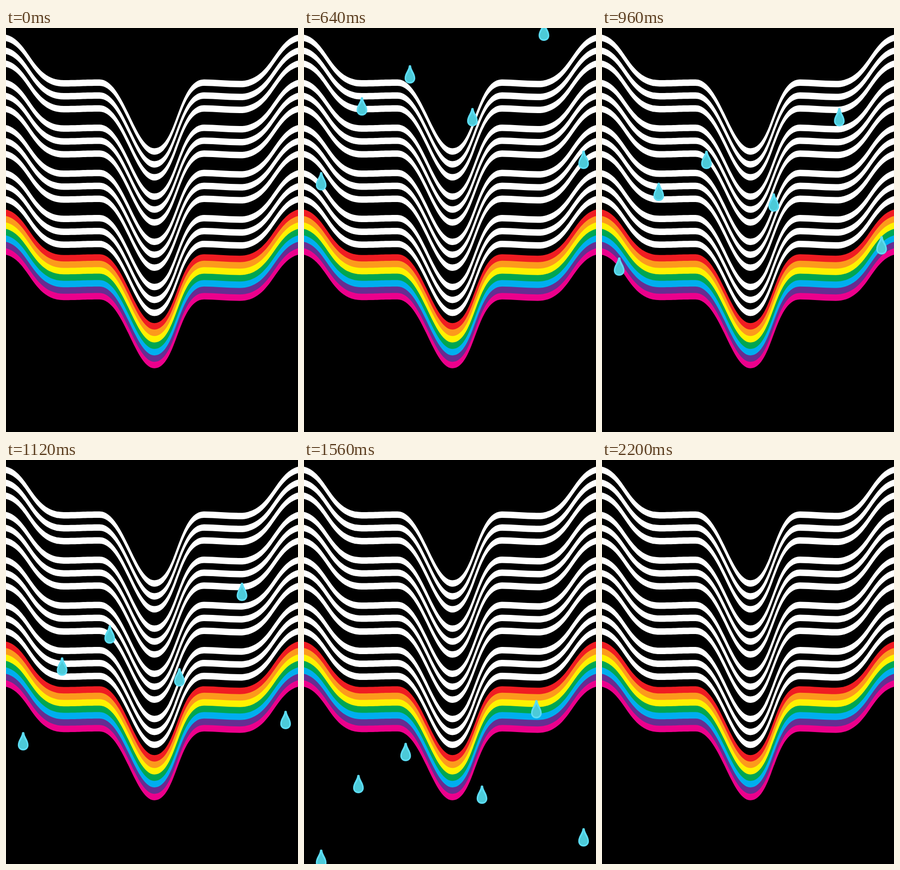
Write an HTML page that moves like this. It is 612x845 px and loops after 2280 ms.

```html
<!DOCTYPE html>
<html lang="en">
<head>
<meta charset="utf-8">
<title>Rainbow waves and falling drops</title>
<style>
  html, body { margin: 0; width: 100%; height: 100%; overflow: hidden; background: #000; }
  svg { display: block; width: 100vw; height: 100vh; }
</style>
</head>
<body>
<svg viewBox="0 0 612 845">
  <defs>
    <g id="drop">
      <path fill="#5cdcf3" d="M-2.4 1Q0-1 2.4 1C2.8 10 11.2 17 11.2 27.5C11.2 34 6 38.5 0 38.5S-11.2 34-11.2 27.5C-11.2 17-2.8 10-2.4 1Z"/>
      <path fill="#4ccad8" d="M0 8C2 15 8 20 8 27C8 32 5 35 0 35S-8 32-8 27C-8 20-2 15 0 8Z"/>
    </g>
  </defs>
  <g id="waves"></g>
  <g id="rain"></g>
</svg>
<script>
const NS = 'http://www.w3.org/2000/svg';
const LOOP = 2280, STEP = 40, LAST = 55;
const FALL = 22.33, TOP = -33.8, LIFE = 40;
const BAND = 13.5, GROUP = 7 * BAND;

// Upper edge of the first stripe, closed far below the stage.
const WAVE = 'M0 14C49 26 55 109 121 109C150 109 165 107.5 196 107.5' +
  'C246 107.5 270 251.5 311 251.5C358 251.5 361 107.5 415 107.5' +
  'C440 107.5 460 110.5 490 110.5C556 110.5 562 28 612 14V900H0Z';

const RAINBOW = ['#f01c22', '#fc9a1c', '#fff200', '#00a651', '#00aeef', '#662d91', '#ec008c'];

// x at entry, sideways drift per step, step of entry
const DROPS = [
  [36, 0, 1],
  [586, 0, 3],
  [345.2, 0.87, 7],
  [124, -0.32, 8],
  [224, -0.39, 11],
  [503.6, -0.69, 15]
];

function add(parent, tag, attrs) {
  const el = document.createElementNS(NS, tag);
  for (const key in attrs) el.setAttribute(key, attrs[key]);
  return parent.appendChild(el);
}

// Each layer covers everything below its edge, so only a band of it stays visible.
const waves = document.getElementById('waves');
const layer = (dy, fill) => add(waves, 'path', { d: WAVE, fill, transform: `translate(0 ${dy})` });

for (let group = 0; group < 4; group++) {
  for (let line = 0; line < 3; line++) {
    const dy = group * GROUP + line * 2 * BAND;
    layer(dy, '#fff');
    layer(dy + BAND, '#000');
  }
}
[...RAINBOW, '#000'].forEach((fill, i) => layer(365.7 + i * BAND, fill));

const rain = document.getElementById('rain');
const drops = DROPS.map(([x, drift, start]) =>
  ({ x, drift, start, el: add(rain, 'use', { href: '#drop' }) }));

function draw() {
  const step = Math.min(Math.floor(performance.now() % LOOP / STEP), LAST);
  for (const { x, drift, start, el } of drops) {
    const age = step - start;
    el.setAttribute('visibility', age >= 0 && age < LIFE ? 'visible' : 'hidden');
    el.setAttribute('transform', `translate(${x + drift * age} ${TOP + FALL * age})`);
  }
  requestAnimationFrame(draw);
}
draw();
</script>
</body>
</html>
```
